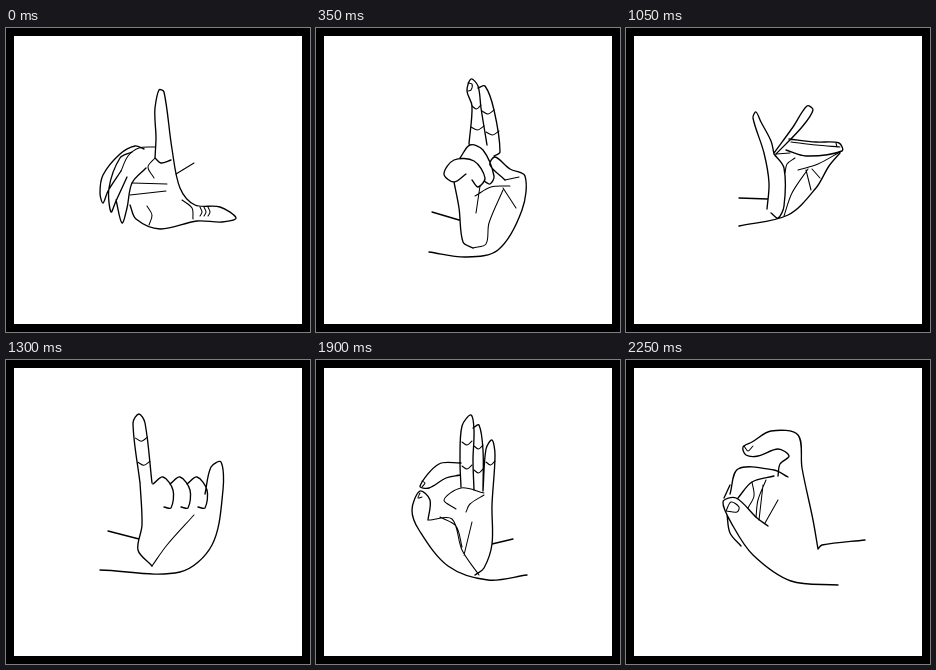
Write an HTML page that moves like this. It is 304 px wide and 304 px high and loops after 2600 ms.

```html
<!DOCTYPE html>
<html lang="en">
<head>
<meta charset="utf-8">
<title>Hand signs</title>
<style>
html, body { margin: 0; width: 100%; height: 100%; overflow: hidden; background: #000; }
svg { display: block; width: 100%; height: 100%; }
path { fill: none; stroke: #000; stroke-linecap: round; stroke-linejoin: round; }
#outline { stroke-width: 1.35; }
#crease { stroke-width: 1.05; }
</style>
</head>
<body>
<svg viewBox="0 0 304 304">
  <rect width="304" height="304"/>
  <rect x="8" y="8" width="288" height="288" fill="#fff"/>
  <path id="outline"/>
  <path id="crease"/>
</svg>
<script>
const LOOP = 2600;
let outline, crease;

// Smooth path through the points; tangents follow the neighbouring points.
function spline(xy) {
  const p = [];
  for (let i = 0; i < xy.length; i += 2) p.push({ x: xy[i], y: xy[i + 1] });
  const dist = (a, b) => Math.hypot(b.x - a.x, b.y - a.y);
  const slope = i => {
    const a = p[i - 1] || p[i], b = p[i], c = p[i + 1] || p[i];
    const len = dist(a, b) + dist(b, c);
    return { x: (c.x - a.x) / len, y: (c.y - a.y) / len };
  };
  let d = `M${p[0].x} ${p[0].y}`;
  for (let i = 1; i < p.length; i++) {
    const a = p[i - 1], b = p[i], s = slope(i - 1), e = slope(i), k = dist(a, b) / 3;
    d += `C${a.x + s.x * k} ${a.y + s.y * k} ${b.x - e.x * k} ${b.y - e.y * k} ${b.x} ${b.y}`;
  }
  return d;
}

const curve = (...xy) => { outline += spline(xy); };
const thin = (...xy) => { crease += spline(xy); };
const fold = (x, y, w) => thin(x, y, x + w / 2, y + 3, x + w, y - 1);

// Straight finger from the middle of its base to its tip.
function finger(bx, by, tx, ty, w) {
  curve(bx - w, by, tx - w, ty + w * 1.5, tx, ty, tx + w, ty + w * 1.5, bx + w, by);
  for (const k of [.35, .7]) fold(tx + (bx - tx) * k - w, ty + (by - ty) * k, w * 2);
}

// Index up, thumb out, three fingers folded.
function corner() {
  curve(149, 130, 150, 109, 149, 92, 149, 80, 153, 62, 158, 64, 166, 121, 174, 160, 189, 177,
    214, 179, 230, 190, 216, 194, 191, 193, 154, 201, 130, 191, 124, 177);
  curve(149, 130, 155, 135, 165, 132);
  curve(138, 121, 129, 118, 114, 126, 97, 147, 94, 165, 97, 175, 102, 163, 115, 143);
  curve(126, 124, 114, 130, 103, 160, 105, 184, 110, 173, 121, 149);
  curve(110, 172, 116, 195, 121, 180, 126, 155, 140, 140);
  thin(115, 143, 122, 128, 133, 120, 149, 119);
  thin(149, 130, 142, 139, 148, 150);
  thin(126, 155, 161, 156);
  thin(124, 167, 160, 163);
  thin(170, 146, 188, 135);
  thin(141, 178, 146, 187, 143, 197);
  thin(176, 172, 186, 180, 187, 191);
  for (const x of [194, 198, 202]) thin(x, 179, x + 2, 184, x, 188);
}

// Two fingers up, the others held by the thumb.
function pair() {
  curve(153, 116, 156, 78, 151, 63, 155, 51, 162, 58, 165, 80, 171, 117);
  curve(162, 60, 169, 58, 178, 82, 184, 124, 178, 128);
  curve(144, 130, 154, 117, 167, 122, 178, 148, 174, 156, 168, 153);
  curve(150, 146, 138, 154, 128, 146, 138, 132, 158, 133, 169, 150, 162, 159, 156, 152);
  curve(138, 154, 143, 180, 147, 214, 157, 220);
  curve(189, 152, 174, 137, 179, 129, 194, 141, 209, 148, 206, 182, 182, 222, 150, 229, 113, 224);
  curve(116, 184, 143, 192);
  fold(156, 78, 9);
  fold(166, 83, 12);
  fold(155, 99, 13);
  fold(170, 104, 13);
  thin(152, 55, 156, 56, 155, 62, 152, 63);
  thin(157, 220, 170, 216, 173, 195, 187, 162);
  thin(159, 168, 175, 159, 194, 158);
  thin(187, 160, 200, 180);
  thin(189, 152, 203, 149);
  thin(164, 158, 160, 185);
}

function openPalm() {
  finger(138, 128, 132, 77, 5);
  finger(148, 126, 144, 63, 6);
  finger(159, 127, 158, 57, 6);
  finger(171, 130, 171, 66, 6);
  curve(133, 128, 141, 165, 143, 195, 149, 215);
  curve(177, 130, 189, 146, 209, 128, 215, 136, 203, 172, 180, 220, 109, 226);
  curve(111, 184, 143, 191);
  thin(137, 140, 158, 142, 177, 132);
  thin(150, 216, 172, 195, 187, 151);
}

// Thumb meets two fingers, two spread.
function beak() {
  curve(148, 126, 145, 113, 135, 94, 130, 84, 127, 90, 138, 125, 143, 155, 141, 181);
  curve(148, 125, 167, 99, 181, 78, 187, 82, 176, 99, 150, 126);
  curve(163, 111, 190, 114, 213, 115, 216, 123, 180, 128, 160, 122);
  curve(214, 125, 203, 138, 190, 160, 162, 187, 113, 198);
  curve(113, 170, 142, 171);
  curve(148, 126, 158, 140, 158, 178, 152, 190, 145, 185);
  thin(165, 114, 190, 117, 214, 119);
  thin(210, 115, 211, 119);
  thin(214, 124, 192, 136, 172, 142);
  thin(158, 188, 166, 165, 182, 141);
  thin(180, 142, 185, 162);
  thin(186, 141, 194, 150);
  thin(159, 145, 161, 136, 169, 130);
  thin(150, 126, 164, 125);
}

// Little finger and thumb up, three folded.
function horns() {
  finger(140, 123, 133, 54, 6);
  for (const x of [147, 164, 181]) curve(x, 124, x + 10, 117, x + 20, 130, x + 18, 148, x + 11, 147);
  curve(199, 134, 205, 107, 215, 102, 217, 130, 206, 185, 174, 212, 94, 210);
  curve(134, 122, 136, 165, 132, 190, 146, 206);
  curve(102, 171, 133, 179);
  thin(146, 206, 161, 185, 188, 155);
}

function fan() {
  curve(152, 122, 159, 95, 158, 70, 152, 66, 149, 75, 139, 130, 129, 186, 133, 204, 150, 203);
  curve(150, 203, 158, 180, 157, 140, 148, 124, 139, 130);
  curve(156, 121, 177, 100, 203, 80, 214, 79, 200, 94, 178, 108, 160, 123);
  curve(176, 118, 182, 109, 193, 117, 204, 155, 196, 167, 190, 152, 182, 129, 175, 122);
  curve(192, 113, 213, 111, 232, 131, 218, 133, 203, 128);
  curve(207, 165, 219, 144, 231, 139, 228, 158, 201, 195, 160, 212, 97, 203);
  curve(106, 164, 129, 174);
  thin(163, 196, 169, 172, 188, 160);
  thin(158, 125, 171, 122, 181, 130);
  for (const y of [135, 144, 152]) thin(157, y, 170, y - 2, 185, y);
  thin(195, 168, 203, 182, 201, 195);
  thin(150, 69, 153, 68, 153, 73);
  thin(225, 143, 229, 146, 227, 151);
}

// Index and thumb joined, three upright.
function ring() {
  curve(145, 127, 144, 100, 146, 66, 155, 55, 158, 70, 157, 100, 158, 130);
  curve(157, 68, 163, 65, 167, 90, 167, 131);
  curve(167, 131, 170, 89, 176, 80, 179, 95, 176, 145, 176, 184, 168, 208, 159, 215);
  curve(144, 115, 130, 118, 113, 128, 104, 126, 123, 104, 145, 103);
  curve(112, 160, 114, 140, 104, 131, 96, 150, 103, 170, 132, 206, 172, 220, 211, 215);
  curve(176, 184, 197, 179);
  for (const y of [82, 106]) {
    fold(146, y, 10);
    fold(158, y + 4, 9);
  }
  fold(170, 102, 9);
  thin(140, 149, 128, 140, 145, 128, 168, 133);
  thin(113, 160, 136, 159, 146, 190, 163, 215);
  thin(124, 157, 140, 166, 146, 187);
  thin(168, 135, 154, 144, 150, 152);
  thin(156, 162, 148, 195);
  thin(104, 133, 102, 138, 106, 137);
  thin(106, 121, 109, 123, 106, 127);
}

// Hooked index over a closed hand.
function hook() {
  curve(152, 116, 154, 104, 163, 96, 152, 89, 132, 96, 120, 95, 117, 87, 126, 82, 145, 71,
    172, 75, 176, 108, 187, 160, 192, 189);
  curve(104, 134, 112, 109, 148, 110, 162, 117);
  curve(112, 138, 126, 122, 148, 116);
  curve(142, 166, 131, 158, 110, 138, 97, 142, 107, 166, 127, 195, 165, 221, 212, 225);
  curve(104, 125, 98, 138);
  curve(101, 155, 104, 173, 115, 186);
  curve(192, 189, 196, 185, 239, 180);
  thin(100, 151, 105, 142, 113, 147, 111, 152, 100, 151);
  thin(118, 86, 122, 91, 127, 86);
  thin(126, 122, 128, 136, 122, 148);
  thin(140, 120, 132, 140, 130, 157);
  thin(137, 125, 133, 160);
  thin(152, 140, 139, 163);
}

// Each pose is held until the next one starts.
const poses = [
  [0, corner], [350, pair], [700, openPalm], [1050, beak],
  [1300, horns], [1550, fan], [1900, ring], [2250, hook]
];

let shown;
function update() {
  const t = performance.now() % LOOP;
  const pose = poses.findLast(([start]) => start <= t)[1];
  if (pose !== shown) {
    shown = pose;
    outline = crease = '';
    pose();
    document.getElementById('outline').setAttribute('d', outline);
    document.getElementById('crease').setAttribute('d', crease);
  }
  requestAnimationFrame(update);
}
update();
</script>
</body>
</html>
```
